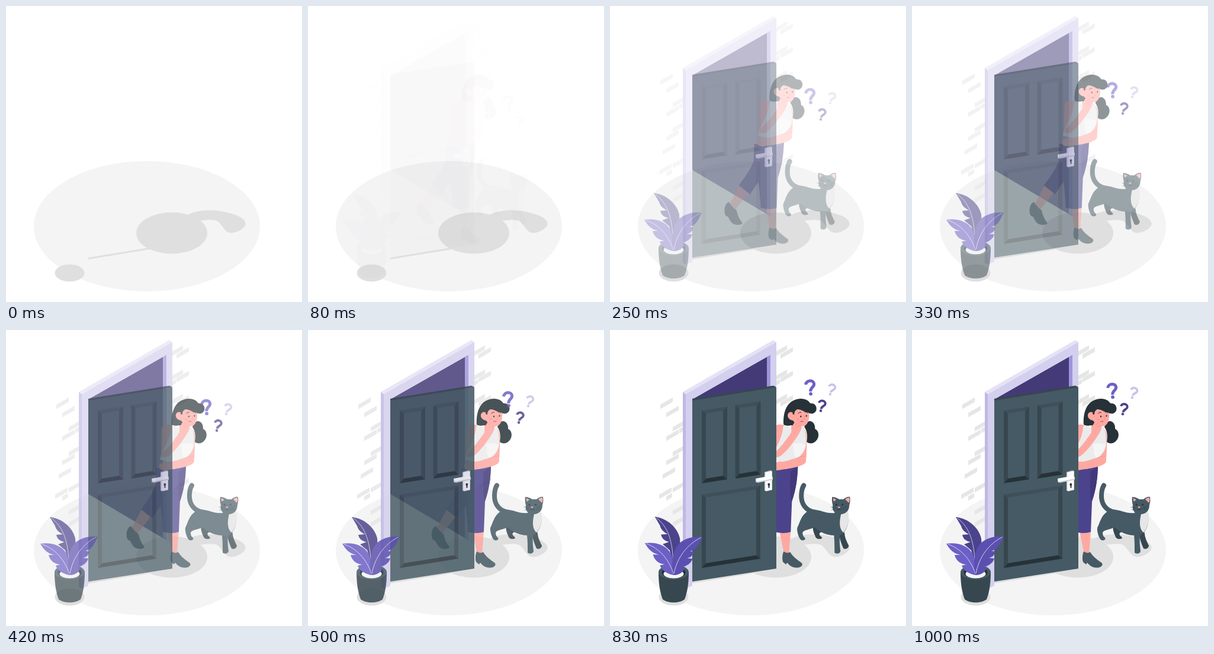
Animation, 500 px wide and 500 px high, one loop 1.04 s. Source, as an HTML page with a canvas:

```html
<!DOCTYPE html>
<html lang="en">
<head>
<meta charset="utf-8">
<title>Behind the door</title>
<style>
html, body { margin: 0; width: 100%; height: 100%; overflow: hidden; background: #fff; }
canvas { display: block; width: 100vw; height: 100vh; }
</style>
</head>
<body>
<canvas id="stage" width="500" height="500"></canvas>
<script>
const LOOP = 1040, FPS = 24;
const stage = document.getElementById('stage').getContext('2d');
const sheet = document.createElement('canvas');
sheet.width = sheet.height = 500;
const ink = sheet.getContext('2d');
let g = stage;

const C = {
  floor: '#f4f4f4', shade: '#dfdfdf', brick: '#e6e6e6',
  violet: '#6c60c6', mid: '#5b50b0', deep: '#4b438c', night: '#433a77',
  frame: '#d3cfee', frameSide: '#bfb8e6', frameTop: '#e5e2f6', jamb: '#9d94da',
  slate: '#455a64', dark: '#37474f', black: '#263238',
  skin: '#ffa8a2', blush: '#f28f8b', shirt: '#ebebeb'
};

function fill(d, color) {
  g.fillStyle = color;
  g.fill(new Path2D(d));
}
function line(d, color, width) {
  g.strokeStyle = color;
  g.lineWidth = width;
  g.lineCap = g.lineJoin = 'round';
  g.stroke(new Path2D(d));
}
function oval(x, y, rx, ry, color, turn = 0) {
  g.fillStyle = color;
  g.beginPath();
  g.ellipse(x, y, rx, ry, turn, 0, Math.PI * 2);
  g.fill();
}

// Draws a group flat, then blends it as one picture.
function layer(alpha, dx, draw) {
  if (alpha <= 0) return;
  g = ink;
  g.setTransform(1, 0, 0, 1, 0, 0);
  g.clearRect(0, 0, 500, 500);
  g.translate(dx, 0);
  draw();
  g = stage;
  g.globalAlpha = alpha;
  g.drawImage(sheet, 0, 0);
  g.globalAlpha = 1;
}

function ground() {
  oval(238, 372, 191, 110, C.floor);
  oval(107.5, 451, 25, 14.5, C.shade);
  oval(280, 383.5, 60, 35, C.shade);
  fill('M139 425L240 408.5L246 410.5L139 428Z', C.shade);
  fill('M306 353C325 343 355 342 385 352C400 357 407 364 404 371C398 380 383 386 375 382C366 377 362 363 353 362C343 360 335 362 326 363Z', C.shade);
}

const bricks = [
  [85, 126, 21], [95, 140, 21], [106, 164, 17], [95, 180, 21], [117, 167, 6],
  [106, 206, 17], [95, 221, 21], [89, 244, 21], [83, 278, 21], [106, 267, 17],
  [95, 281, 10], [106, 305, 17], [106, 325, 17],
  [281, 36, 18], [288, 41, 21], [281, 77, 18], [288, 81, 21], [281, 86, 6],
  [281, 118, 18], [288, 122, 21], [288, 262, 21]
];
function wall() {
  for (const [x, y, w] of bricks) {
    const r = y - w * .57;
    fill(`M${x} ${y}L${x + w} ${r}V${r + 7.5}L${x} ${y + 7.5}Z`, C.brick);
  }
}

function doorway() {
  fill('M139 117L271 42V355L139 277Z', C.night);
  fill('M265 45.5L271 42V355L265 351.5Z', C.jamb);
  fill('M128 108L281 20V361L271 355V42L139 117V432L128 437Z', C.frame);
  fill('M123 104.5L128 108V437L123 434Z', C.frameSide);
  fill('M123 104.5L276 17L281 20.5L128 108.5Z', C.frameTop);
}

function panel(x, y, w, h) {
  const s = w * .158, i = 7, k = i * .158;
  const r = x + w, b = y + h;
  const a = y - k + i - 1, z = b - k - i;
  const ra = a - (w - 2 * i) * .158, rz = z - (w - 2 * i) * .158;
  fill(`M${x} ${y}L${r} ${y - s}L${r - i} ${ra}L${x + i} ${a}Z`, '#3e515b');
  fill(`M${x} ${y}L${x + i} ${a}V${z}L${x} ${b}Z`, C.dark);
  fill(`M${r} ${y - s}L${r - i} ${ra}V${rz}L${r} ${b - s}Z`, C.dark);
  fill(`M${x} ${b}L${x + i} ${z}L${r - i} ${rz}L${r} ${b - s}Z`, C.black);
}

function door() {
  fill('M139 117L276 95L281 97V403L139 425Z', C.slate);
  fill('M139 116L276 94L281 96.5L144 118.5L139 119Z', C.dark);
  panel(155, 136, 43, 123);
  panel(211.5, 127, 43, 124);
  panel(155, 278, 99, 124);
  fill('M261 240L271 237L274 238.5V270L264 272.5L261 271Z', '#c9c9d0');
  fill('M262.5 240.5L273.5 238.5V270L262.5 272Z', '#fafafa');
  fill('M246 252L270 247.5L275 248V253L250 258L246 257Z', '#d0d0d6');
  fill('M246 251L270 246.5L274 247.5V251.5L248 256Z', '#ffffff');
  oval(268.3, 261, 1.9, 2.2, C.black);
  fill('M267.6 261H269.2L269.6 266.5L267.4 266.8Z', C.black);
}

function legs() {
  // far leg, bent back
  fill('M241 300L257 312L240 334L230 346L221 337Z', C.skin);
  fill('M221 331C216 333 213 340 214 348C214 353 217 356 220 356C222 361 226 368 231 369C237 371 244 369 244 366C239 361 236 353 234 345C230 342 225 337 221 331Z', C.dark);
  fill('M264 233L292 235C290 262 284 278 276 290L257 318L238 303C250 287 260 272 263 262Z', C.deep);
  // near leg
  fill('M283 340H302L299 378L291 379Z', C.skin);
  fill('M290 374C294 377 298 377 301 375C306 384 315 389 321 394C323 398 319 401 313 401.5C305 402 300 398 296 393L294 396L289 392C287 386 288 379 290 374Z', C.slate);
  fill('M264 234C280 238 300 235 314 229C314 248 311 270 304 290L302 341C294 344 282 343 275 341C274 310 268 275 264 234Z', C.deep);
  fill('M302 239L314 230C313 252 311 270 303 289C300 272 301 253 302 239Z', '#413979');
}

function torso() {
  fill('M273 165C277 159 287 158 291 162L289 210C284 220 274 219 272 210Z', C.skin);
  fill('M304 150L321 158L322 174L302 174Z', C.skin);
  fill('M320 164C327 166 330 176 329 188C329 200 329 214 327 224C322 231 300 234 280 237C270 238 267 232 270 226L311 213L319 190Z', C.skin);
  fill('M289 163C296 160 300 164 306 170C313 171 318 165 321 161C326 167 328 176 328 190C328 201 323 208 317 214C308 222 296 225 282 222L270 219C274 200 288 186 289 163Z', C.shirt);
  fill('M305 193C312 190 321 191 327 194C326 204 320 210 312 216C305 212 309 202 305 193Z', '#f5f5f5');
  fill('M281 223C293 223 304 218 315 215L327 211L328 222C322 230 300 234 281 236Z', C.skin);
  line('M327 213C322 213 317 214 313 216', C.blush, .7);
}

function head() {
  fill('M327 158C335 149 344 157 343 167C350 170 351 181 345 187C340 193 332 192 329 189C331 178 329 169 325 164Z', C.black);
  fill('M290 160C289 145 292 122 312 117C323 114 333 118 335 125L329 160L302 161C298 162 294 162 290 160Z', C.black);
  fill('M308 134C314 128 330 130 333 139C334 148 332 157 327 161C321 165 310 160 306 153C300 152 296 148 297 143C298 138 304 137 307 141Z', C.skin);
  fill('M305 142C306 134 309 129 316 127C324 122 332 121 336 124C343 123 347 130 345 136C342 143 334 142 331 139C325 139 318 133 313 134C309 136 308 139 308 143Z', C.black);
  oval(319, 146, 1.2, 1.6, C.black);
  oval(328.5, 145, 1.1, 1.5, C.black);
  line('M314.5 141Q317 138 319.5 139', C.black, 1);
  line('M326 138.5Q328 137.5 330.5 140', C.black, 1);
  line('M324.5 145L326 151L323.5 151.3', C.blush, .8);
  oval(314, 151, 2.4, 2, '#ff9893');
  line('M318.5 155Q320.5 153 323 154.6', '#a5403f', 1);
}

function hand() {
  fill('M274 208C283 201 295 185 303 173C303 165 306 157 311 154C314 153 316 155 315 157C319 156 321 159 319 161C321 163 320 169 316 175C308 188 297 203 286 212C279 217 272 216 274 208Z', C.skin);
  line('M310 160L315 157M311 164L319 161', C.blush, .8);
}

function cat() {
  line('M344 308C328 306 319 294 320 278Q320.5 268 324 262.5', C.slate, 8);
  // far legs
  fill('M341 326L360 340C352 341 348 343 352 348C356 350 356 353 351 353C346 353 344 351 343 347C340 341 338 334 341 326Z', C.dark);
  fill('M386 336L393 343C393 350 397 358 400 364C400 369 394 371 391 369C388 362 385 355 384 346Z', C.dark);
  fill('M334 304C350 301 360 311 376 309L380 303L397 306C402 319 399 334 391 343L385 347C384 357 385 366 386 373C386 378 379 379 376 376C376 365 376 355 375 347C364 347 352 342 342 333C336 337 325 337 322 342C322 346 323 349 326 351C328 354 324 356 320 355C316 353 312 340 313 334C318 326 318 313 334 304Z', C.slate);
  fill('M387 311C392 311 396 308 398 304C402 315 400 333 391 342C385 337 383 327 387 311Z', '#e6e6e6');
  fill('M372 282C376 282 381 284 384 286L391 286C394 283 399 281 402 282C403 288 402 292 401 296C401 306 394 311 386 311C377 311 371 305 373 296C372 292 371 287 372 282Z', C.slate);
  fill('M394 286C396 284 399 283 401 283.5C402 287 401 290 400 292Z', C.skin);
  fill('M373.5 284L379 286.5L374.5 290Z', C.skin);
  oval(379, 295, 1.5, 1.6, C.black);
  oval(389.5, 295, 1.5, 1.6, C.black);
  fill('M381 298.5L386 298.3L383.6 301.5Z', C.skin);
  line('M383.6 301.5V303M380 303.5Q382 305 383.6 303Q386 305 388 303', C.black, .8);
  line('M377 300L370 299M377 302L371 304M391 300L398 298M391 302L397 303', C.black, .5);
}

function people() {
  legs();
  torso();
  head();
  hand();
  cat();
}

function mark(x, y, size, turn, color) {
  g.save();
  g.translate(x, y);
  g.rotate(turn);
  g.scale(size, size);
  g.lineCap = 'butt';
  g.strokeStyle = color;
  g.lineWidth = 5;
  g.stroke(new Path2D('M-7 -5C-6 -13 7 -13 7 -5C7 0 .3 0 .3 7'));
  oval(.3, 11, 2.9, 2.9, color);
  g.restore();
}
function marks(y) {
  mark(338, 102.5 + y, 1, -.07, C.violet);
  mark(374, 106 + y, .76, .28, '#c9c3ea');
  mark(357.5, 133.5 + y, .78, .2, C.deep);
}

function leaves(turn) {
  g.save();
  g.translate(107, 413);
  g.rotate(turn);
  g.translate(-107, -413);
  fill('M74 316C95 318 113 334 117 352C119 372 114 390 109 404L100 372L88 362L99 358C91 357 86 352 85 346L96 345C88 341 84 336 83 331C80 326 77 321 74 316Z', C.deep);
  line('M77 318C94 331 104 351 106 388', '#e8e6f6', .8);
  fill('M58 361C76 358 94 364 101 376C107 388 109 402 108 414C98 413 87 407 84 398L92 396C82 396 74 389 72 380L82 380C70 378 63 370 58 361Z', C.violet);
  line('M61 362C82 369 98 386 107 411', '#f0eefb', .8);
  fill('M155 349C135 347 117 354 110 369C104 384 103 401 108 414C117 414 125 408 126 401L119 400C129 400 137 393 139 386L130 385C137 383 140 380 140 374L134 373C146 371 150 359 155 349Z', C.mid);
  line('M152 350C129 362 113 384 108 411', '#f0eefb', .8);
  g.restore();
}

function plant(turn) {
  fill('M82 409C82 430 85 445 89 455C98 462 117 462 126 455C130 445 133 430 133 409Z', C.dark);
  oval(107.5, 409, 25.5, 12.5, C.slate);
  oval(107.5, 409.5, 20, 9.8, C.black);
  oval(107.5, 412, 17, 7.4, '#f5f5f5');
  leaves(turn);
}

const clamp = v => Math.min(1, Math.max(0, v));

function draw(ms) {
  const step = Math.floor((ms % LOOP + 4) * FPS / 1000);
  const p = clamp((step - 1.85) / 12.1);
  const sway = (1 - Math.cos(2 * Math.PI * clamp((step - 14) / 10.3))) / 2;
  const slide = -31 * (1 - p) + 3.5 * sway;
  const rise = 62 * (1 - Math.pow(p, 1.5)) - 6 * sway;

  g = stage;
  g.fillStyle = '#fff';
  g.fillRect(0, 0, 500, 500);
  ground();
  layer(p, 0, wall);
  layer(p, 0, doorway);
  layer(p, slide, people);
  layer(p, 0, door);
  layer(p, 0, () => plant(.02 * sway));
  layer(p, 0, () => marks(rise));
}

const start = performance.now();
function tick() {
  draw(performance.now() - start);
  requestAnimationFrame(tick);
}
tick();
</script>
</body>
</html>
```
